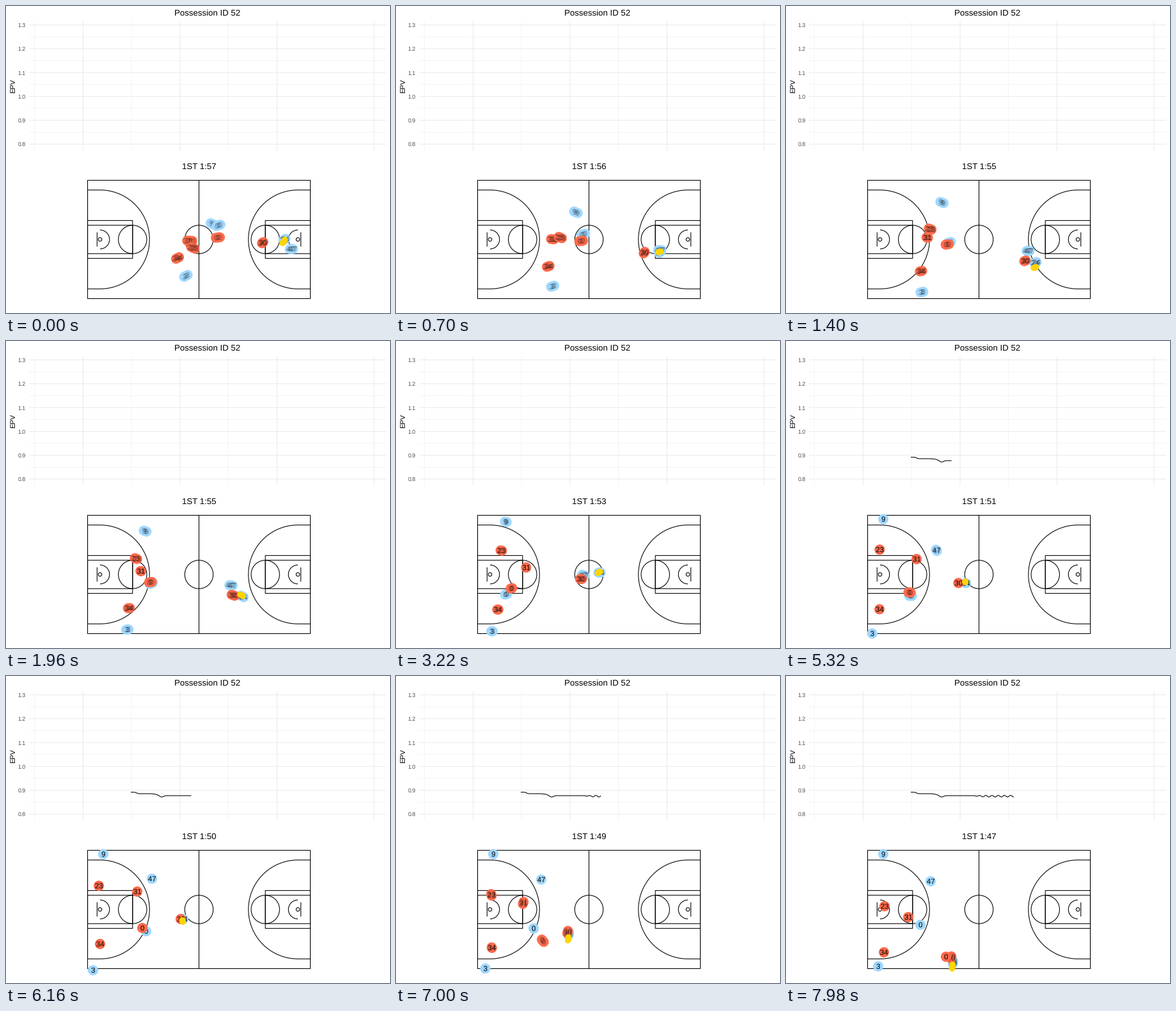
A matplotlib script that plays this animation: 600 px wide and 480 px high, repeating every 8000 ms.

```python
import numpy as np
import matplotlib.pyplot as plt
from matplotlib.animation import FuncAnimation
from matplotlib.collections import LineCollection, PathCollection
from matplotlib.path import Path
from matplotlib.textpath import TextPath
from matplotlib.transforms import IdentityTransform

plt.rcParams.update({"font.family": "Liberation Sans", "toolbar": "None",
                     "text.hinting": "none"})

W, H, DPI = 600, 480, 100
PT = 72 / DPI                 # points per pixel
LOOP, TICK, STEP = 8000, 40, 140
BLUE, RED, GOLD = "#9fd8ff", "#fd6b4d", "#ffd400"
LINE = 1.07 * PT

fig = plt.figure(figsize=(W / DPI, H / DPI), dpi=DPI, facecolor="white")
ax = fig.add_axes([0, 0, 1, 1])
ax.set(xlim=(0, W), ylim=(H, 0))
ax.axis("off")


def label(x, y, s, px, color="black", ha="center", **kw):
    return ax.text(x, y, s, fontsize=px * PT, color=color, ha=ha,
                   va="baseline", **kw)


def lines(segments, color, width):
    ax.add_collection(LineCollection(segments, colors=color, linewidths=width,
                                     snap=False))


# --- chart ---------------------------------------------------------------
def hline(y):
    return [(36, y), (594, y)]


def vline(x):
    return [(x, 24), (x, 226)]


major_y = [29.5 + 37.3 * i for i in range(6)]
lines([hline(y + 18.65) for y in major_y[:-1]]
      + [vline(44.5 + 151.5 * i) for i in range(3)], "#ebebeb", LINE / 2)
lines([hline(y) for y in major_y]
      + [vline(120.5 + 151.5 * i) for i in range(4)], "#ebebeb", LINE)
for i, y in enumerate(major_y):
    label(31, y + 3.4, f"{1.3 - i / 10:.1f}", 8.8, "#4d4d4d", "right")
label(14, 125.3, "EPV", 11, rotation=90, rotation_mode="anchor")
label(315, 15, "Possession ID 52", 13.2)
clock = label(301.5, 255, "", 13.2)
epv, = ax.plot([], [], color="black", lw=LINE)


def epv_y(x):
    """Two soft drops, a dip, then a ripple that grows in."""
    drop = lambda mid, width: 1 / (1 + np.exp((mid - x) / width))
    ripple = np.clip((x - 290) / 20, 0, 1) * (
        0.8 - 1.3 * np.cos(2 * np.pi * (x - 351) / 9.7))
    return (181.7 + 2.3 * drop(204, 1) + 3.1 * drop(236, 3)
            + 2.4 * np.exp(-((x - 243) / 4) ** 2) + ripple)


# --- court ---------------------------------------------------------------
MX, MY, FT = 301.5, 365, 3.7


def arc(x, r, a0=0, a1=360):
    a = np.radians(np.linspace(a0, a1, 80))
    return np.column_stack([x + r * np.cos(a), MY + r * np.sin(a)])


def box(x0, x1, dy):
    return [(x0, MY - dy), (x1, MY - dy), (x1, MY + dy), (x0, MY + dy),
            (x0, MY - dy)]


def half_court(side):
    def X(feet):
        return MX + side * (174 - feet * FT)

    mid = 0 if side < 0 else 180
    hoop, three = X(5.25), 77.3
    first, last = (X(0), MY + side * three), (X(0), MY - side * three)
    return [
        box(X(0), X(19), 8 * FT),
        box(X(0), X(19), 6 * FT),
        arc(X(19), 6 * FT),
        arc(hoop, 0.75 * FT),
        arc(hoop, 4 * FT, mid - 90, mid + 90),
        [(X(4), MY - 3 * FT), (X(4), MY + 3 * FT)],
        np.vstack([first, arc(hoop, three, mid - 90, mid + 90), last, first]),
    ]


lines([box(MX - 174, MX + 174, 92.5), [(MX, MY - 92.5), (MX, MY + 92.5)],
       arc(MX, 6 * FT)] + half_court(-1) + half_court(1), "black", LINE)


# --- paths: each maps an array of times (in steps) to points --------------
SET, CUT, END = 31, 44, 57    # offence set, first cut, end of the loop


def smooth(u):
    u = np.clip(u, 0, 1)
    return u * u * (3 - 2 * u)


def run(start, spot, *cuts, arrive=SET, power=(1.6, 2)):
    """Sprint to a spot, slowing down, then ease through later cuts."""
    stops = np.array([start, spot, *cuts], float)
    moves = np.diff(stops, axis=0)

    def at(t):
        left = 1 - np.minimum(t / arrive, 1)[:, None]
        pos = stops[0] + moves[0] * (1 - left ** np.array(power))
        for begin, move in zip((SET, CUT), moves[1:]):
            pos = pos + move * smooth((t - begin) / (END - CUT))[:, None]
        return pos
    return at


def weave(*points):
    """Curve through a few points without overshoot."""
    k = np.array([0, 12, 23, SET, CUT, END], float)
    v = np.array(points, float)
    s = np.diff(v, axis=0) / np.diff(k)[:, None]
    a, b = s[:-1], s[1:]
    same = a * b > 0
    inner = np.where(same, 2 * a * b / np.where(same, a + b, 1), 0)
    m = np.vstack([s[:1], inner, s[-1:]])

    def at(t):
        i = np.clip(np.searchsorted(k, t) - 1, 0, len(k) - 2)
        h = (k[i + 1] - k[i])[:, None]
        u = (t - k[i])[:, None] / h
        w = u * u * (3 - 2 * u)
        return (v[i] * (1 - w) + v[i + 1] * w
                + h * u * (1 - u) * ((1 - u) * m[i] - u * m[i + 1]))
    return at


def dribble(carrier):
    def at(t):
        bounce = 3 + 5 * np.cos(2 * np.pi * (t - 10) / 8)
        return carrier(t) + np.column_stack([np.full_like(t, -1), bounce])
    return at


# --- players -------------------------------------------------------------
TRAIL = np.array([-0.375, -0.125, 0.125, 0.375])   # samples within one step


class Mover:
    """A disc, optionally numbered, drawn as a short trail along its path."""

    def __init__(self, color, path, num=None, diameter=15.4):
        self.path = path
        disc = Path.unit_circle()
        r = diameter / 2 * PT
        self.layers = [self.layer(Path(disc.vertices * r, disc.codes), color, 1)]
        if num is not None:
            tp = TextPath((0, 0), str(num), size=11.4 * PT)
            v = tp.vertices
            mid = (v.min(axis=0) + v.max(axis=0)) / 2
            self.layers.append(self.layer(Path(v - mid, tp.codes), "black", 0.36))

    @staticmethod
    def layer(shape, color, alpha):
        c = PathCollection([shape], sizes=[1], facecolors=color, alpha=alpha,
                           edgecolors="none", offsets=np.zeros((4, 2)),
                           offset_transform=ax.transData, zorder=5)
        c.set_transform(IdentityTransform())
        return ax.add_collection(c, autolim=False)

    def place(self, step):
        pos = self.path(step + TRAIL)
        for c in self.layers:
            c.set_offsets(pos)


carrier = weave((435, 365), (380, 403), (318, 362), (287, 377), (277, 380),
                (261, 448))
movers = [
    Mover(BLUE, run((323, 341), (152, 278.5)), 9),
    Mover(BLUE, run((332, 343), (164, 398), (219, 399), (210, 389),
                    arrive=25, power=(1.2, 1.3)), 0),
    Mover(BLUE, run((281, 422), (133, 454), (136, 460), (144, 454),
                    power=(1.6, 4)), 3),
    Mover(BLUE, carrier, 24),
    Mover(BLUE, weave((446, 380), (365, 383), (293, 366), (252, 348),
                      (228, 317), (226, 321)), 47),
    Mover(RED, run((287, 367), (203, 346), (205, 337), (191, 377),
                   power=(4, 0.7)), 31),
    Mover(RED, run((292, 378), (148, 324), (145, 328), (154, 360)), 23),
    Mover(RED, run((268, 394), (145, 420), (147, 419), (153, 432),
                   power=(1.6, 4)), 34),
    Mover(RED, weave((401, 370), (366, 400), (289, 372), (265, 377),
                     (273, 380), (258, 440)), 30),
    Mover(RED, run((331, 362), (168, 392), (213, 394), (250, 439),
                   arrive=28, power=(1.5, 1)), 0),
    Mover(GOLD, dribble(carrier), diameter=9.6),
]


def draw(i):
    step = (i * TICK + TICK // 2) // STEP
    for m in movers:
        m.place(step)
    clock.set_text(f"1ST 1:{int(57.55 - 0.17 * step):02d}")
    x = 195.5 + 1.28 * np.arange(max(0, 4 * (step - 26) + 2))
    epv.set_data(x, epv_y(x))
    return []


anim = FuncAnimation(fig, draw, frames=LOOP // TICK, interval=TICK,
                     repeat=True, repeat_delay=0, blit=False)
plt.show()
```
